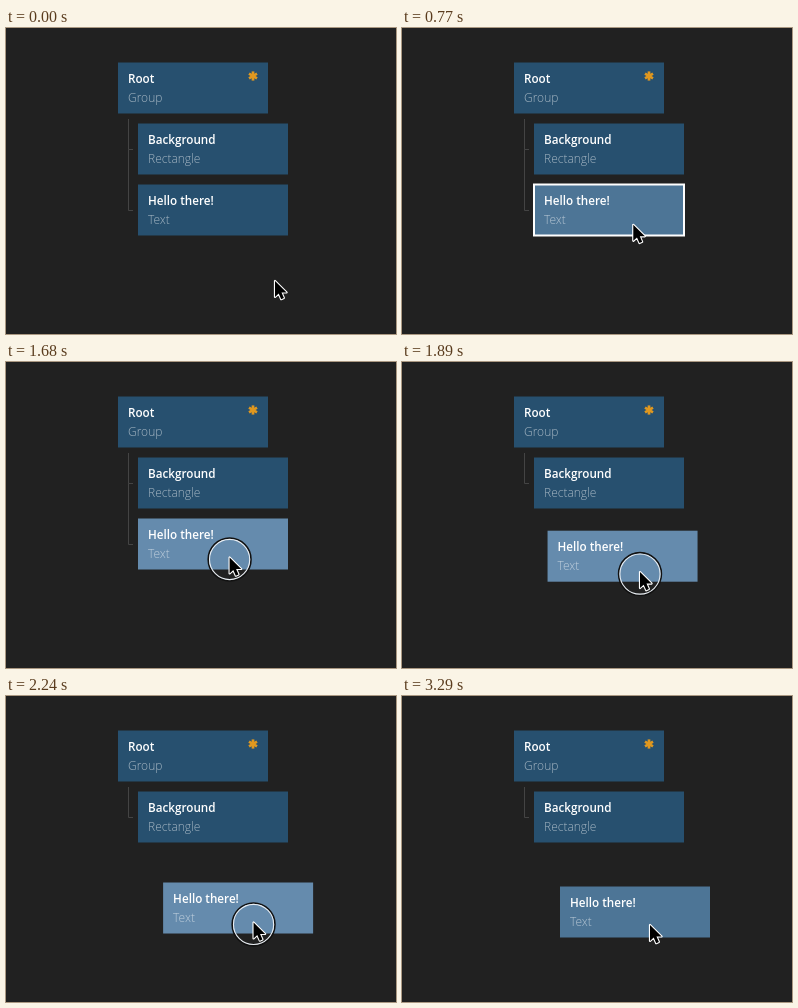
Write an HTML page with a canvas that moves like this. It is 390 px wide and 306 px high and loops after 3.36 s.

```html
<!DOCTYPE html>
<html>
<head>
<meta charset="utf-8">
<style>
  html, body { margin: 0; width: 100%; height: 100%; overflow: hidden; background: #212121; }
  canvas { display: block; }
</style>
</head>
<body>
<canvas id="stage" width="390" height="306"></canvas>
<script>
const ctx = document.getElementById('stage').getContext('2d');
const LOOP = 3360, STEP = 70;
const IDLE = '#27506f', HOVER = '#4d7596', PRESSED = '#658bad';
const arrow = new Path2D('M0 0V16L3.7 12.6L6.2 18.2L8.9 17L6.5 11.5H11.6Z');

const clamp = v => Math.max(0, Math.min(1, v));
const smooth = v => v * v * (3 - 2 * v);

// Distance the pointer has been dragged from where the button went down.
function dragged(t) {
  const rest = 1 - clamp((t - 1470) / 910);
  return { x: 47 * (1 - rest ** 2.5), y: 51 * (1 - rest ** 1.6) };
}

function pointerAt(t) {
  const approach = smooth(clamp((t - 420) / 560)), drag = dragged(t);
  return {
    x: 269 - 68 * approach ** 1.55 + drag.x,
    y: 253 - 75 * approach ** 0.76 + drag.y
  };
}

// The card trails the pointer slightly and only moves past a threshold.
function cardOffset(t) {
  const drag = dragged(t - 45);
  return { x: Math.max(0, drag.x - 21), y: Math.max(0, drag.y - 17) };
}

function line(color, width, ...points) {
  ctx.strokeStyle = color;
  ctx.lineWidth = width;
  ctx.beginPath();
  points.forEach(([x, y]) => ctx.lineTo(x, y));
  ctx.stroke();
}

function ring(x, y, radius, color, width) {
  ctx.strokeStyle = color;
  ctx.lineWidth = width;
  ctx.beginPath();
  ctx.arc(x, y, radius, 0, Math.PI * 2);
  ctx.stroke();
}

function card(x, y, title, type, color) {
  ctx.fillStyle = color;
  ctx.fillRect(x, y, 150, 51);
  ctx.fillStyle = '#fff';
  ctx.font = '600 11.7px "Open Sans", sans-serif';
  ctx.fillText(title, x + 10, y + 20.5);
  ctx.fillStyle = 'rgba(255,255,255,.58)';
  ctx.font = '300 12px "Open Sans", sans-serif';
  ctx.fillText(type, x + 10, y + 39.5);
}

function asterisk(x, y) {
  for (let i = 0; i < 3; i++) {
    const a = Math.PI / 2 + i * Math.PI / 3, dx = 4.6 * Math.cos(a), dy = 4.6 * Math.sin(a);
    line('#e0981f', 2.7, [x - dx, y - dy], [x + dx, y + dy]);
  }
}

function draw(t) {
  const pointer = pointerAt(t), offset = cardOffset(t);
  const pressed = t >= 1330 && t < 2590;
  const hovered = pointer.y <= 208 || t >= 1330;
  const attached = !offset.x && !offset.y;

  ctx.fillStyle = '#212121';
  ctx.fillRect(0, 0, 390, 306);

  line('#444', 1, [122.5, 91], [122.5, 121.5], [127, 121.5]);
  if (attached) line('#444', 1, [122.5, 121.5], [122.5, 182.5], [127, 182.5]);

  card(112, 34.5, 'Root', 'Group', IDLE);
  asterisk(247, 48);
  card(132, 95.5, 'Background', 'Rectangle', IDLE);

  const color = t >= 1330 && t < 2800 ? PRESSED : hovered ? HOVER : IDLE;
  card(132 + offset.x, 156.5 + offset.y, 'Hello there!', 'Text', color);
  if (hovered && t < 910) {
    ctx.strokeStyle = '#fff';
    ctx.lineWidth = 2;
    ctx.strokeRect(132, 156.5, 150, 51);
  }

  if (pressed) {
    ring(pointer.x, pointer.y + 2, 21.4, '#111', 1.6);
    ring(pointer.x, pointer.y + 2, 20.1, '#e8edf2', 1.1);
  }

  ctx.save();
  ctx.translate(pointer.x, pointer.y);
  ctx.lineJoin = 'round';
  ctx.strokeStyle = '#fff';
  ctx.lineWidth = 2.2;
  ctx.stroke(arrow);
  ctx.fillStyle = '#000';
  ctx.fill(arrow);
  ctx.restore();
}

const start = performance.now();
function tick() {
  const t = (performance.now() - start) % LOOP;
  draw(Math.floor(t / STEP) * STEP);
  requestAnimationFrame(tick);
}
tick();
</script>
</body>
</html>
```
